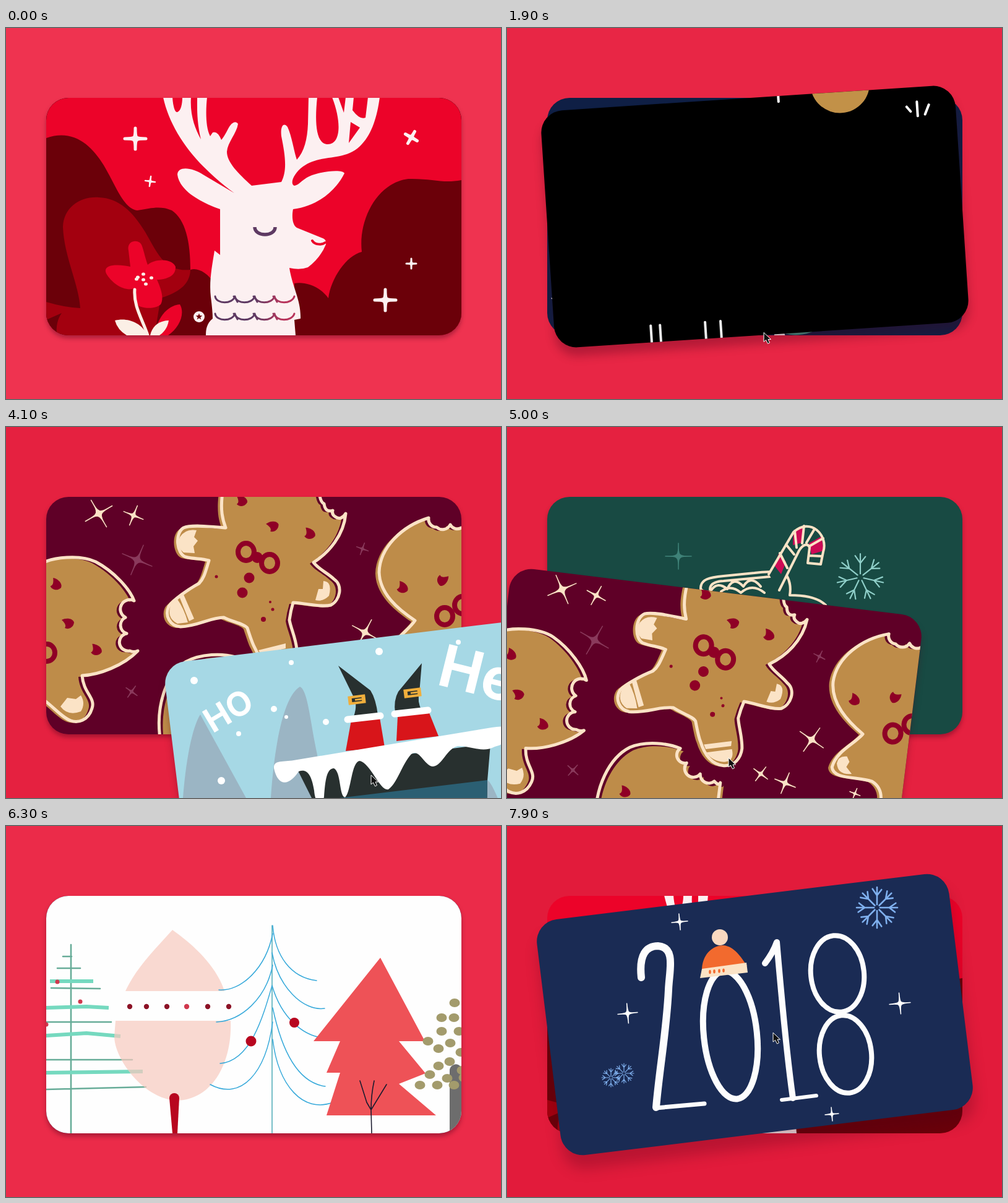
An HTML page that plays this animation: 800 by 600 pixels, repeating every 8000 ms.

```html
<!DOCTYPE html>
<html lang="en">
<head>
<meta charset="utf-8">
<title>Holiday cards</title>
<style>
html, body { margin: 0; width: 100%; height: 100%; overflow: hidden; }
#stage { position: relative; width: 800px; height: 600px; overflow: hidden; }
.card { position: absolute; left: 65px; top: 113px; width: 671px; height: 384px; border-radius: 36px; overflow: hidden; }
.card svg { display: block; }
#cursor { position: absolute; left: 0; top: 0; width: 800px; height: 600px; z-index: 50; }
</style>
</head>
<body>
<div id="stage"></div>
<script>
const stage = document.getElementById('stage');

// ---- drawing helpers -------------------------------------------------
const fill = (d, color, extra = '') => `<path d="${d}" fill="${color}" ${extra}/>`;
const line = (d, color, width, extra = '') =>
  `<path d="${d}" fill="none" stroke="${color}" stroke-width="${width}" stroke-linecap="round" stroke-linejoin="round" ${extra}/>`;
const dot = (x, y, r, color) => `<circle cx="${x}" cy="${y}" r="${r}" fill="${color}"/>`;
const oval = (x, y, rx, ry, color, turn = 0) =>
  `<ellipse cx="${x}" cy="${y}" rx="${rx}" ry="${ry}" fill="${color}" transform="rotate(${turn} ${x} ${y})"/>`;
const group = (transform, body) => `<g transform="${transform}">${body}</g>`;

// Four-pointed sparkle; soft rounds and thickens the arms.
function spark(x, y, r, color, turn = 0, soft = 1.5) {
  const arm = `M0 ${-r}C0 0 0 0 ${r} 0C0 0 0 0 0 ${r}C0 0 0 0 ${-r} 0C0 0 0 0 0 ${-r}Z`;
  return `<path transform="translate(${x} ${y}) rotate(${turn})" fill="${color}" stroke="${color}" stroke-width="${soft}" stroke-linejoin="round" d="${arm}"/>`;
}

function star(x, y, r, color, turn = 0) {
  const points = Array.from({ length: 10 }, (_, i) => {
    const a = i * Math.PI / 5 + turn * Math.PI / 180, d = i % 2 ? r * .43 : r;
    return `${x + d * Math.sin(a)},${y - d * Math.cos(a)}`;
  });
  return `<polygon points="${points.join(' ')}" fill="${color}"/>`;
}

function flake(x, y, r, arms, color, width) {
  let out = '';
  for (let i = 0; i < arms; i++)
    out += group(`rotate(${i * 360 / arms})`,
      line(`M0 ${-r * .15}V${-r}M0 ${-r * .6}L${-r * .22} ${-r * .92}M0 ${-r * .6}L${r * .22} ${-r * .88}`, color, width));
  return group(`translate(${x} ${y})`, out);
}

// Overlap of two circles [x, y, r].
function lens([x1, y1, r1], [x2, y2, r2], color) {
  const d = Math.hypot(x2 - x1, y2 - y1), ux = (x2 - x1) / d, uy = (y2 - y1) / d;
  const a = (d * d + r1 * r1 - r2 * r2) / (2 * d), h = Math.sqrt(r1 * r1 - a * a);
  const at = s => `${x1 + a * ux - s * h * uy} ${y1 + a * uy + s * h * ux}`;
  return fill(`M${at(1)}A${r1} ${r1} 0 0 0 ${at(-1)}A${r2} ${r2} 0 0 0 ${at(1)}Z`, color);
}

// ---- cards -----------------------------------------------------------
function deer() {
  const red = '#ec0329', dark = '#6b0009', mid = '#a3000f', white = '#fcf0f1', cream = '#fbefe6';
  const scallops = y => line(`M338 ${y}` + 'c2 13 28 13 32 0'.repeat(4), 'url(#thread)', 3) +
    [370, 402, 434].map(x => line(`M${x - 2} ${y}q4 4 6 9`, 'url(#thread)', 3)).join('');
  return `<defs><linearGradient id="thread" gradientUnits="userSpaceOnUse" x1="338" y1="0" x2="466" y2="0">
      <stop offset=".5" stop-color="#5e3a63"/><stop offset=".85" stop-color="#b8355c"/></linearGradient></defs>` +
    fill('M65 178C108 163 137 188 158 222C178 256 190 292 212 295C235 291 250 287 268 295C290 310 298 345 298 391C311 387 326 397 336 412V497H65Z', dark) +
    fill('M736 246C705 252 690 243 650 244C600 250 569 310 575 362C550 368 525 405 521 437C505 415 480 410 466 413V497H736Z', dark) +
    fill('M65 443Q95 452 120 453C118 415 94 370 92 322C93 290 120 272 150 274C182 275 205 297 225 330C244 362 255 395 298 391C297 420 270 430 250 437L240 497H65Z', mid) +
    fill('M65 472L90 461Q80 475 82 497H65Z', dark) +
    fill('M198 360C194 342 217 340 220 353C224 365 225 372 229 383C240 373 268 372 274 386C275 402 258 407 244 407C252 425 255 438 250 447C238 457 214 453 208 444C206 435 209 428 207 421C192 427 171 413 162 397C155 381 183 382 201 386Z', red) +
    fill('M241 497C243 470 260 449 281 447C290 462 280 485 262 497Z', red) +
    line('M208 423C206 450 220 470 229 497', cream, 5) +
    fill('M176 473C195 468 218 475 229 497H195Q180 488 176 473Z', cream) +
    fill('M233 497C236 482 248 473 263 473Q261 488 248 497Z', cream) +
    [[222, 398], [213, 403], [235, 404], [211, 406], [222, 407], [226, 414]].map(([x, y]) => oval(x, y, 3, 2.6, cream)).join('') +
    dot(312, 467, 9, white) + star(312, 467, 5.5, dark) +
    fill('M254 112C262 150 285 190 320 225Q345 250 369 267L320 238C300 225 278 223 277 237C280 262 312 281 346 293V367L337 360C333 385 328 410 331 435Q334 458 334 470C324 478 323 488 323 497H468L466 472L476 470C477 440 463 420 458 388Q475 392 488 387Q508 372 517 350Q518 342 512 340L470 323C462 318 462 302 464 293C502 288 532 265 547 235C545 228 510 231 490 240C476 247 474 254 466 255C458 252 465 235 480 224C510 202 548 218 575 188C592 170 600 142 604 112H489L488 155C487 180 482 200 470 213C465 198 462 175 455 160C449 152 443 158 445 175C451 205 455 230 445 249L397 255C375 235 357 217 357 200C358 185 373 170 375 155C371 149 364 153 359 163Q353 175 348 181Q342 166 334 169L330 175C322 160 323 130 325 112Z', white) +
    fill('M269 112C270 127 273 137 277 136C283 134 285 122 285 112Z M299 112C297 140 305 162 315 180C308 150 309 130 309 112Z M503 112C499 150 500 188 520 188C542 188 542 150 527 112Z M537 112L546 137L549 112Z M562 112H585L581 145Q572 149 560 133Z M557 152L572 161L554 186Z', red) +
    line('M402 322C402 338 435 338 435 322', '#5e3a63', 5.5, 'style="stroke-linecap:butt"') +
    line('M495 344C499 351 511 351 516 347', red, 4) + scallops(434) + scallops(462) +
    spark(209, 179, 17, white, 0, 5) + spark(233, 248, 8, white, 8, 2.5) + spark(655, 177, 11, white, 30, 5) +
    spark(655, 381, 8, white, 0, 3) + spark(613, 440, 17, white, 0, 5);
}

function night() {
  return dot(552, 99, 48, '#c29148') +
    line('M451 112V122M657 144L663 152M674 137V160M693 143L686 158', '#fff', 4) +
    line('M221 470V497M236 470V497M309 470V497M334 470V497', '#ececec', 4);
}

function lights() {
  const berry = '#932463', green = '#419f8d', peach = '#f9c480';
  const a = [129, 254, 69], b = [60, 209, 56], c = [199, 360, 69], d = [281, 375, 56],
    e = [547, 203, 69], f = [640, 199, 69], g = [460, 431, 69], h = [551, 391, 56];
  return group('rotate(-3.2 400.5 305)',
    dot(396, 214, 69, berry) + dot(...a, '#3769b0') + dot(...b, peach) + lens(a, b, '#92a9c6') +
    dot(...c, berry) + lens(a, c, '#5e57b0') + dot(...d, '#bf8c48') + lens(c, d, '#de4d63') +
    dot(...f, berry) + dot(...e, green) + lens(e, f, '#729f9a') +
    dot(...g, green) + dot(...h, peach) + lens(g, h, '#9be2a8') +
    line('M234 215L149 364L303 371ZM155 261L308 270L222 417Z', '#fff', 20) +
    [[508, 107, 59], [660, 191, 59], [502, 280, 59], [94, 429, 32], [384, 466, 18], [430, 491, 18], [479, 471, 18]]
      .map(([x, y, r]) => star(x, y, r, '#fff', 2)).join(''));
}

function chimney() {
  const coal = '#28302f', gray = '#9bb5c4', red = '#d8151a';
  const words = (text, x, y, size, turn) =>
    `<text transform="translate(${x} ${y}) rotate(${turn})" font-family="Inter,sans-serif" font-weight="700" font-size="${size}" fill="#fff">${text}</text>`;
  const buckle = (x, y) => group(`translate(${x} ${y}) rotate(-7)`,
    '<rect x="-14" y="-7" width="28" height="14" fill="#f0ae3c"/><rect x="-8" y="-3" width="16" height="6" fill="#28302f"/><path d="M-3 0H8" stroke="#f0ae3c" stroke-width="3"/>');
  return group('rotate(7 400.5 305) translate(-209 -228)',
    fill('M283 760C278 600 295 495 314 465L388 600L470 760Z', gray) +
    fill('M426 760C420 580 440 440 475 420C488 425 492 480 503 530L530 760Z', gray) +
    fill('M776 760V570Q785 570 810 640V760Z', gray) +
    fill('M470 552L783 512L778 572L775 760H515L494 600Z', coal) +
    fill('M514 603L778 571L776 690L520 720Z', '#2b5f73') +
    fill('M537 386L589 426Q598 440 601 466L562 468Q569 448 561 435Z', coal) +
    fill('M672 382L668 430Q664 442 672 460L629 463Q626 442 634 428Z', coal) +
    buckle(567, 441) + buckle(657, 430) +
    fill('M558 474L604 470L612 518L549 524Z', red) + fill('M633 468L683 460L699 500L631 508Z', red) +
    line('M552 473L605 467M628 464L682 458', '#fff', 11) +
    fill('M433 552C432 538 448 542 465 539L785 486Q812 481 813 492C815 508 800 515 790 517C770 528 750 515 730 516C712 520 705 548 690 549C676 548 668 519 655 529C640 545 632 577 618 586C605 590 590 545 572 540C558 540 558 590 548 599C538 597 542 558 530 552C518 552 516 572 514 598C511 615 500 612 498 588C494 562 486 552 473 557C458 580 440 583 433 552Z', '#fff') +
    words('HO', 334, 496, 54, -31) + words('He', 694, 416, 94, 14) +
    [[304, 410, 6], [461, 381, 4], [603, 363, 6], [433, 456, 5], [453, 469, 3], [517, 477, 5], [376, 496, 4], [348, 572, 6], [731, 348, 4]]
      .map(p => dot(...p, '#fff')).join(''));
}

function cookies() {
  const dough = '#be8c49', icing = '#fbe3c6', jam = '#8f0026', dim = '#8a3a5c';
  // The dough is printed slightly off its icing outline.
  const cookie = (d, shift = '-6 2') => fill(d, dough, `transform="translate(${shift})"`) + line(d, icing, 5);
  const eye = (x, y, turn = 0) => group(`translate(${x} ${y}) rotate(${turn})`, fill('M-10-6C-3-10 8-9 10-2C9 7 0 10-5 7C-2 3-5-1-10-6Z', jam));
  const ring = (x, y) => `<ellipse cx="${x}" cy="${y}" rx="13" ry="14" fill="none" stroke="${jam}" stroke-width="8"/>`;
  return cookie('M350 105C346 135 350 150 355 163C340 162 300 157 287 163C272 172 276 205 290 210C305 214 315 212 328 216C322 235 320 245 312 253C295 262 270 280 263 290C256 305 265 322 282 323C310 322 330 308 352 308C365 315 385 318 390 325C395 340 398 350 402 357C411 377 425 392 444 391C462 390 470 375 470 360C468 340 460 325 458 312Q460 297 464 284C485 285 510 292 525 288C540 280 545 256 530 246C520 236 505 230 497 219C522 203 546 175 549 140Q541 152 532 145Q526 141 528 135Q516 139 514 124Q508 122 506 105Z') +
    cookie('M55 222C75 210 120 206 145 218C175 234 200 262 207 281A13 13 0 0 0 193 308A14 14 0 0 0 195 334A14 14 0 0 0 200 362Q207 365 213 362C190 386 150 401 123 402C125 430 145 438 139 455C133 475 116 479 105 475C90 470 75 450 55 437Z') +
    cookie('M750 163H736A13 13 0 0 1 718 158A14 14 0 0 1 696 162A13 13 0 0 1 683 147C640 160 604 195 603 235C604 270 634 295 661 313C650 330 622 345 618 372C622 392 660 382 685 387Q702 395 703 415L690 510H750Z') +
    cookie('M250 510C240 450 260 400 290 380C315 366 350 366 371 372A13 13 0 0 0 384 394A14 14 0 0 0 408 409A14 14 0 0 0 432 418Q440 425 442 419V510Z', '6 4') +
    fill('M281 178Q290 164 308 167L304 178L310 184L303 193L305 204L287 203Q275 193 281 178Z', icing) +
    fill('M267 286L276 277Q288 294 294 316L277 318Q258 308 267 286Z M280 274L287 271L304 310L296 314Z', icing) +
    fill('M500 280L505 262L512 262L513 249Q528 250 522 273Q512 283 500 280Z', icing) +
    fill('M408 361L452 350V358L412 368Z M414 373L454 363Q461 382 444 385Q424 386 414 373Z', icing) +
    fill('M88 452L99 438L113 440L121 434Q129 447 121 460Q100 468 88 452Z', icing) +
    fill('M625 365Q626 352 640 352L645 360L641 369L651 379Q629 384 625 365Z', icing) +
    eye(380, 120, 20) + eye(431, 161, -10) + eye(490, 173, 30) + eye(80, 255, 40) + eye(100, 318) + eye(145, 361, 30) +
    eye(640, 260, 40) + eye(705, 247, 120) + eye(290, 453, 30) +
    ring(388, 202) + ring(426, 220) + dot(406, 211, 9, jam) + ring(66, 365) + ring(709, 306) + ring(738, 288) +
    [[393, 244, 8.5], [382, 268, 8.5], [340, 242, 2.5], [427, 283, 2], [431, 295, 2.5], [416, 311, 4]].map(p => dot(...p, jam)).join('') +
    spark(150, 140, 25, icing, -30) + spark(206, 143, 17, icing, 22) + spark(580, 332, 23, icing, 28) +
    spark(505, 397, 14, icing, 30) + spark(546, 407, 18, icing, 15) + spark(660, 410, 9, icing, 15) +
    spark(212, 215, 26, dim, 23) + spark(576, 197, 10, dim, 20) + spark(203, 428, 11, dim, 35);
}

function cocoa() {
  const cream = '#fbe3c6', pink = '#cc0a55';
  return spark(277, 209, 21, '#3f8278', 0) + flake(571, 243, 38, 7, '#8fcfc9', 2.2) +
    line('M313 262C312 246 328 243 350 241L400 236Q435 231 452 240Q460 254 457 272C485 272 505 278 515 288M313 262L330 276M328 263Q328 250 350 249L425 242M330 264Q340 249 356 262Q366 240 382 258Q394 238 410 258M346 266Q362 254 378 268Q396 252 416 268', cream, 4) +
    fill('M423 238L463 170C490 145 520 175 511 202L507 222L486 220L489 195C486 187 478 190 472 200L440 264Z', '#184a43') +
    fill('M439 205L451 218L443 238L432 224Z M463 169L481 160L477 187L462 191Z M488 188L508 177L512 200L492 206Z', pink) +
    line('M423 238L463 170C490 145 520 175 511 202L507 222L486 220L489 195C486 187 478 190 472 200L440 264M441 204L453 228M451 190L464 206M465 168L468 195M480 160L477 188M497 165L484 187M511 180L490 192M489 208L509 209', cream, 4);
}

function forest() {
  const crimson = '#b8061f', rose = '#d0384d';
  const leaves = [[725, 286], [704, 310], [724, 310], [704, 332], [732, 332], [682, 348], [718, 351], [699, 360], [735, 366], [717, 381],
    [699, 388], [685, 402], [713, 408], [737, 395], [669, 419], [697, 419], [724, 419], [740, 407]];
  return line('M105 192V497M92 211H106M83 230H120M73 262L152 263M65 317H170M65 378H204M65 426L226 422', '#67ac98', 2.6) +
    line('M71 251H141M65 294L130 292L166 294M65 339L130 335L185 340M65 399L221 397', '#75d9bf', 6, 'style="stroke-linecap:butt"') +
    dot(83, 252, 3.5, rose) + dot(120, 284, 3.5, rose) + dot(65, 321, 3.5, rose) +
    fill('M269 168C300 190 340 225 353 267H193C210 230 240 200 269 168Z M177 315H363C366 380 335 444 275 444C220 440 175 375 175 340Z', '#f8cabf', 'opacity=".7"') +
    [200, 227, 260, 292, 326, 360].map(x => dot(x, 292, 4.2, x === 292 ? rose : '#8c1226')).join('') +
    fill('M264 440a8 8 0 0 1 16 0L277 497H269Z', crimson) +
    line('M430 161V497', '#5fb3bf', 1.7) +
    line('M431 174C420 230 380 268 344 265M431 225C420 280 380 315 340 317M430 258C415 310 395 380 346 384M431 317C420 400 380 445 330 418M431 161C435 210 460 245 502 250M430 205C440 260 480 300 515 295M430 258C445 310 480 340 515 343M431 294C445 360 470 415 516 421M431 345C440 420 480 465 528 447', '#36a9da', 1.5) +
    dot(396, 348, 8.5, crimson) + dot(466, 318, 8, crimson) +
    fill('M605 213L677 348H635L678 400L635 417L695 468H518L540 399H518L540 348H497Z', '#ee5257') +
    line('M591 497L590 459L583 447L572 412M590 459Q590 435 595 412M590 459L615 418', '#1b1b2f', 1.6) +
    fill('M717 497V396a10 10 0 0 1 19 -5V497Z', '#6d6d6d') +
    leaves.map(([x, y]) => oval(x, y, 8.5, 7, '#a39b6c')).join('');
}

function newYear() {
  const white = '#fdfdfd', blue = '#7fb0ee';
  const loop = (x, y, rx, ry, width) =>
    `<ellipse cx="${x}" cy="${y}" rx="${rx}" ry="${ry}" transform="rotate(-6 ${x} ${y})" fill="none" stroke="${white}" stroke-width="${width}"/>`;
  return group('rotate(7 400.5 305)',
    line('M217 245C213 208 225 194 244 194C274 196 262 235 261 265C258 330 246 395 241 455', white, 12) +
    line('M241 456L319 449', white, 7) + loop(361, 338, 43, 104, 10) +
    line('M417 222Q430 205 436 188C443 270 452 370 462 440', white, 10) + line('M444 443L500 436', white, 6) +
    loop(534, 239, 43, 62, 8) + loop(547, 369, 42, 63, 8) +
    fill('M315 234C315 210 330 193 350 193C368 195 378 212 388 226Z', '#f26a2e') +
    dot(344, 180, 13, '#fad9c0') + fill('M315 231L387 221L389 237L312 246Z', '#fbe3c6') +
    [328, 335, 343, 350].map((x, i) => oval(x, 236 - i * .8, 1.8, 3.2, '#f26a2e')).join('') +
    spark(279, 155, 13, white, -5) + spark(195, 303, 16, white, -5) + spark(635, 287, 17, white, -5) + spark(525, 466, 11, white, -5) +
    flake(598, 132, 33, 8, blue, 2.6) + flake(168, 407, 15, 8, blue, 1.2) + flake(189, 400, 16, 8, blue, 1.2));
}

// ---- motion ----------------------------------------------------------
const LOOP = 8000, STEP = 100;
const right = [209, 228], left = [-83, 152];
const below = [430, 660];
const cards = [
  { art: deer, color: '#ec0329', tilt: 450, toss: 900, way: left, grab: [460, 437], from: [795, 560] },
  { art: night, color: '#000', tilt: 1700, toss: 2260, end: 2400, way: right, grab: [400, 325], from: below },
  { art: lights, color: '#0f1f45', tilt: 2610, toss: 3100, way: left, grab: [441, 383], from: [788, 590] },
  { art: chimney, color: '#a6d8e5', tilt: 3500, toss: 4000, way: right, grab: [381, 335], from: below },
  { art: cookies, color: '#5f0027', tilt: 4600, toss: 4900, way: left, grab: [441, 383], from: below },
  { art: cocoa, color: '#184a43', tilt: 5420, toss: 5900, way: right, grab: [381, 335], from: below },
  { art: forest, color: '#fefefe', tilt: 6450, toss: 6900, way: left, grab: [441, 383], from: below },
  { art: newYear, color: '#1a2b54', tilt: 7400, toss: 8000, way: right, grab: [430, 318], from: below }
];

for (const card of cards) {
  card.end ??= card.toss + 260;
  card.el = document.createElement('div');
  card.el.className = 'card';
  card.el.style.background = card.color;
  card.el.innerHTML = `<svg width="671" height="384" viewBox="65 113 671 384">${card.art()}</svg>`;
  stage.append(card.el);
}
stage.insertAdjacentHTML('beforeend', `<svg id="cursor"><g id="pointer">
  <circle id="touch" r="21.5" fill="#b99" fill-opacity=".55" stroke="#fff" stroke-opacity=".45"/>
  <path id="arrow" d="M0 0V15L3.5 12L6.5 18L9.5 16.5L7 11H11.5Z" fill="#111" stroke="#fff"/></g></svg>`);
const [pointer, touch, arrow] = ['pointer', 'touch', 'arrow'].map(id => document.getElementById(id));

const clamp = v => Math.min(1, Math.max(0, v));
const ease = v => { v = clamp(v); return v * v * (3 - 2 * v); };
const mix = (a, b, k) => a + (b - a) * k;
const afterglow = ms => Math.exp(-Math.max(0, ms) / 350);

function draw(time) {
  const current = cards.findIndex(card => time < card.end);
  const card = cards[current];
  const lift = ease((time - card.tilt) / 380);
  const flight = (Math.max(0, time - card.toss) / 100) ** 2;
  const [dx, dy] = card.way.map(v => v * flight);

  cards.forEach(({ el }, i) => {
    const isTop = i === current, isNext = i === (current + 1) % cards.length;
    const height = isTop ? lift / (1 + 2 * flight) : 0;
    el.style.display = isTop || isNext ? '' : 'none';
    el.style.zIndex = isTop ? 2 : 1;
    el.style.transform = isTop ? `translate(${dx}px,${dy}px) rotate(${(card.way === left ? 7 : -7) * lift}deg)` : '';
    el.style.boxShadow = isTop || flight > 0
      ? `0 ${mix(5, 22, height)}px ${mix(7, 22, height)}px rgba(70,0,25,${mix(.38, .26, height)})` : 'none';
  });

  // The backdrop darkens with the lifted card and recovers after the toss.
  let shade = lift * afterglow(time - card.toss);
  if (current > 0) shade = Math.max(shade, afterglow(time - cards[current - 1].toss));
  stage.style.background = `rgb(${mix(239, 226, shade)},${mix(51, 27, shade)},${mix(80, 59, shade)})`;

  const start = card.tilt - 160;
  const reach = ease((time - start) / (card.toss - start));
  const [x, y] = card.grab.map((v, i) => mix(card.from[i], v, reach) + [dx, dy][i]);
  pointer.setAttribute('transform', `translate(${x} ${y})`);
  pointer.style.display = time < start ? 'none' : '';
  touch.style.display = current ? 'none' : '';
  arrow.style.display = current ? '' : 'none';
}

function tick() {
  draw(Math.floor(performance.now() / STEP) * STEP % LOOP);
  requestAnimationFrame(tick);
}
tick();
</script>
</body>
</html>
```
